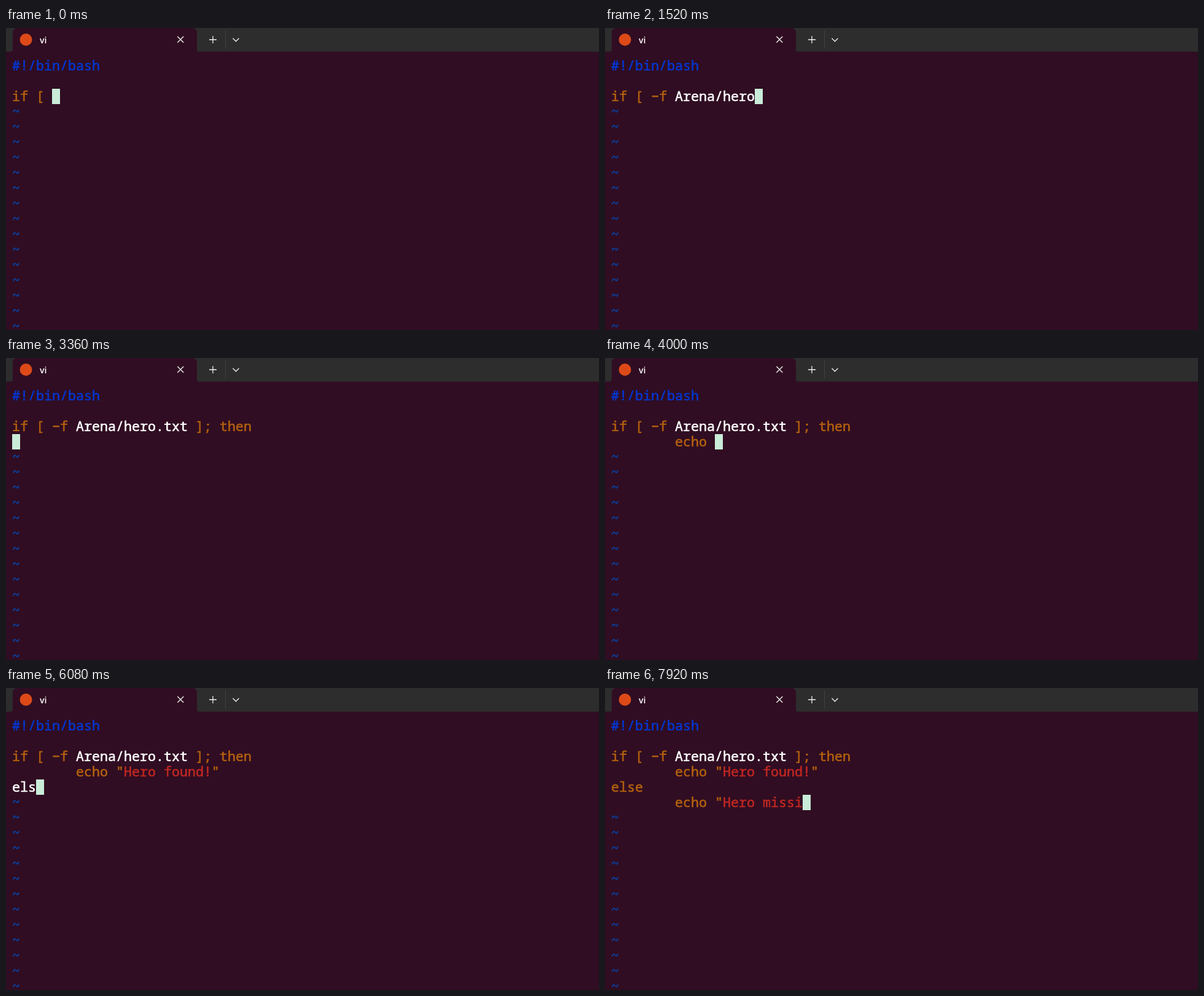
Animation of 966x492 px, one loop 8000 ms. Source, as an HTML page:

```html
<!DOCTYPE html>
<html lang="en">
<head>
<meta charset="utf-8">
<title>Terminal</title>
<style>
  html, body { margin: 0; width: 100%; height: 100%; overflow: hidden; background: #300d22; }
  svg { display: block; width: 966px; height: 492px; }
  #screen text {
    font: 500 21.667px "Noto Sans Mono", "DejaVu Sans Mono", monospace;
    font-variant-ligatures: none;
    white-space: pre;
    stroke-width: 0.6;
    stroke-linejoin: round;
  }
  .title { font: 600 14px "Open Sans", "Noto Sans", sans-serif; fill: #fff; }
  .icon { fill: none; stroke: #f2f2f2; stroke-width: 1.3; }
</style>
</head>
<body>
<svg viewBox="0 0 966 492">
  <rect width="966" height="492" fill="#300d22"/>
  <rect width="966" height="38.6" fill="#2d2d2d"/>
  <path d="M7 39 Q11 39 11 35 V8 Q11 0 19 0 H303 Q311 0 311 8 V35 Q311 39 315 39 Z" fill="#300d22"/>
  <circle cx="32.5" cy="19" r="10" fill="#dd4a18"/>
  <text class="title" x="55" y="24.5">vi</text>
  <path class="icon" d="M279.3 13.8 l10 10 M289.3 13.8 l-10 10"/>
  <path class="icon" d="M331 19 h12 M337 13 v12"/>
  <path d="M357.5 4 V34" stroke="#424242"/>
  <path class="icon" d="M369.5 16.8 l5 5 l5 -5"/>
  <g id="screen"></g>
  <rect id="cursor" width="13" height="25" fill="#c9ecd9"/>
</svg>
<script>
const LOOP = 8000, TICK = 80;
const LEFT = 10, TOP = 49, CELL = 13, LINE = 25, ROWS = 18;
const BLUE = '#0436cf', TILDE = '#0b409f', ORANGE = '#b3600e', RED = '#bf2722', WHITE = '#fff';

// text, first key time, last key time
const typing = [
  ['-f ', 80, 400], ['Arena/hero', 720, 1520], ['.txt', 1600, 2000],
  [' ]', 2160, 2240], [';', 2560, 2560], [' then', 2720, 3120],
  ['\n', 3360, 3360], ['\t', 3440, 3440], ['echo ', 3600, 4000],
  ['"', 4080, 4080], ['Hero found!', 4320, 5040], ['"', 5360, 5360],
  ['\n', 5520, 5520], ['else', 5680, 6160], ['\n\t', 6560, 6560],
  ['ech', 6720, 6880], ['o "He', 6960, 7520], ['ro missi', 7600, 7920]
];

const keys = typing.flatMap(([text, from, to]) => [...text].map((ch, i) => ({
  ch,
  at: from + TICK * Math.floor((to - from) * i / Math.max(1, text.length - 1) / TICK)
})));

const NS = 'http://www.w3.org/2000/svg';
const screen = document.getElementById('screen');
const cursor = document.getElementById('cursor');
const rows = Array.from({ length: ROWS }, (_, i) => {
  const row = document.createElementNS(NS, 'text');
  row.setAttribute('y', TOP + i * LINE + 20);
  screen.append(row);
  return row;
});

// Splits a line into [column, text, colour] pieces
function highlight(line) {
  if (line.startsWith('#')) return [[0, line, BLUE]];
  const parts = [];
  const token = /"([^"]*)("?)|\b(?:if|then|else|echo)\b|-f|[[\];]|[^\s"[\];]+/g;
  for (const m of line.matchAll(token)) {
    const [text, inner, close] = m;
    if (text[0] === '"') {
      parts.push([m.index, '"', ORANGE]);
      if (inner) parts.push([m.index + 1, inner, RED]);
      if (close) parts.push([m.index + 1 + inner.length, close, ORANGE]);
    } else {
      const special = /^(if|then|else|echo|-f|[[\];])$/.test(text);
      parts.push([m.index, text.replace('-', '\u2212'), special ? ORANGE : WHITE]);
    }
  }
  return parts;
}

function fillRow(row, parts) {
  row.replaceChildren(...parts.map(([col, text, color]) => {
    const span = document.createElementNS(NS, 'tspan');
    span.setAttribute('x', LEFT + col * CELL);
    span.setAttribute('fill', color);
    span.setAttribute('stroke', color);
    span.textContent = text;
    return span;
  }));
}

let shown = -1;
function draw(time) {
  const typed = keys.filter(k => k.at <= time);
  if (typed.length === shown) return;
  shown = typed.length;

  const text = '#!/bin/bash\n\nif [ ' + typed.map(k => k.ch).join('');
  const lines = text.replace(/\t/g, ' '.repeat(8)).split('\n');
  rows.forEach((row, i) =>
    fillRow(row, i < lines.length ? highlight(lines[i]) : [[0, '~', TILDE]]));

  const last = lines.length - 1;
  cursor.setAttribute('x', LEFT + lines[last].length * CELL);
  cursor.setAttribute('y', TOP + last * LINE);
}

const start = performance.now();
function frame() {
  draw((performance.now() - start) % LOOP);
  requestAnimationFrame(frame);
}
frame();
</script>
</body>
</html>
```
